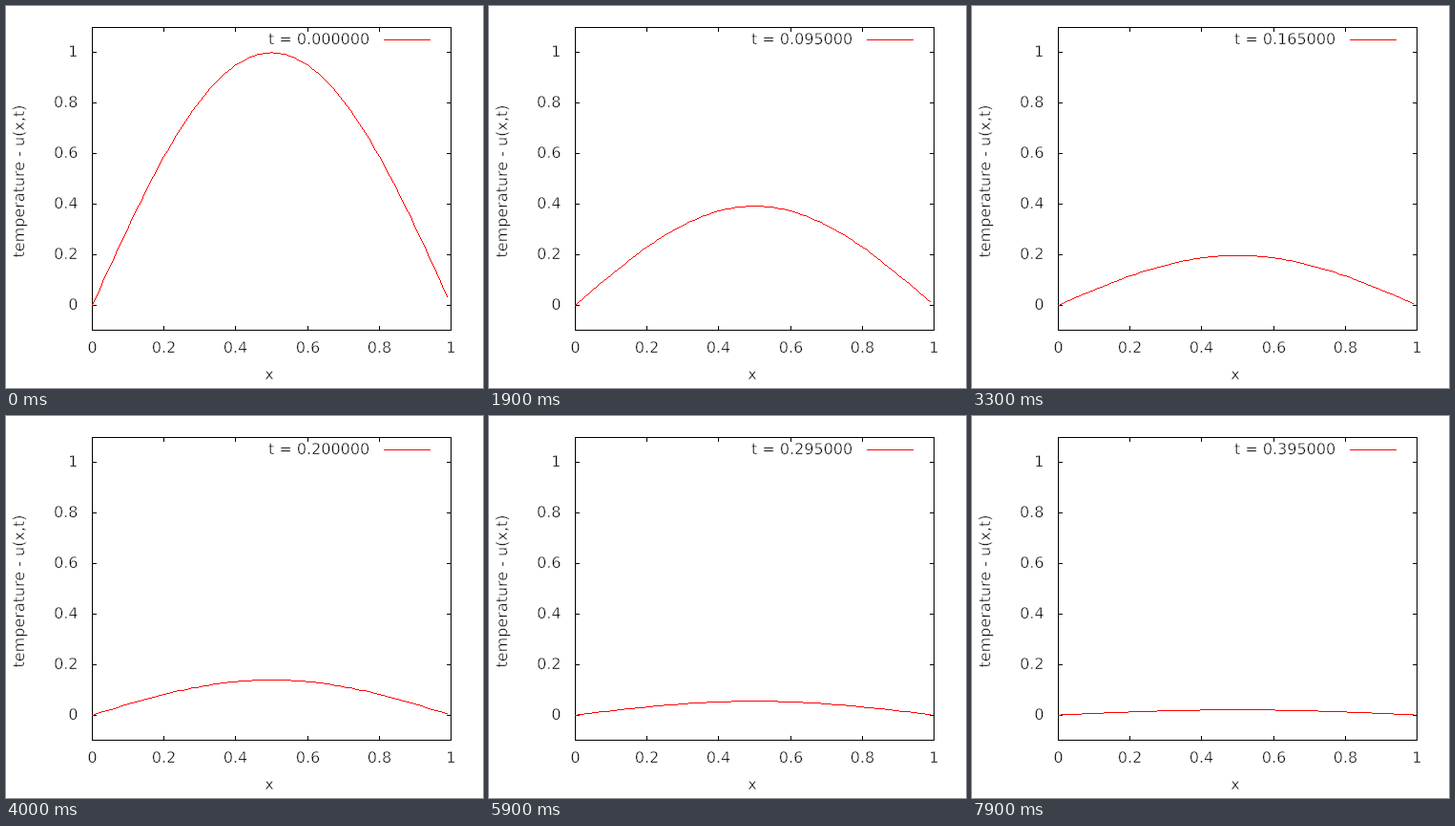
A matplotlib script that plays this animation: 500x400 px, repeating every 8000 ms.

```python
import numpy as np
import matplotlib.pyplot as plt
from matplotlib.animation import FuncAnimation
from matplotlib.patheffects import Stroke

W, H, DPI = 500, 400, 100
PX = 72 / DPI                       # one pixel in points
FRAMES, INTERVAL, DT = 80, 100, 0.005
LEFT, RIGHT, TOP, BOTTOM = 90, 466, 22, 339
TICK = 4
RED = "#ff0000"

plt.rcParams.update({
    "font.family": "DejaVu Sans",
    "font.size": 16 * PX,
    "path.simplify": False,
})

fig = plt.figure(figsize=(W / DPI, H / DPI), dpi=DPI, facecolor="white")
ax = fig.add_axes([0, 0, 1, 1])
ax.set(xlim=(0, W), ylim=(H, 0))
ax.axis("off")


def nearest(v):
    return np.floor(np.asarray(v) + 0.5)


def to_px(x, u):
    """Plot coordinates to the nearest pixel."""
    px = LEFT + np.asarray(x) * (RIGHT - LEFT)
    py = BOTTOM - (np.asarray(u) + 0.1) / 1.2 * (BOTTOM - TOP)
    return nearest(px), nearest(py)


def trace(xs, ys):
    """Stepped one-pixel line through the points, as unit dashes."""
    cells = [(xs[0], ys[0])]
    for x0, y0, x1, y1 in zip(xs, ys, xs[1:], ys[1:]):
        n = int(max(abs(x1 - x0), abs(y1 - y0)))
        s = np.arange(1, n + 1) / max(n, 1)
        cells += zip(nearest(x0 + s * (x1 - x0)), nearest(y0 + s * (y1 - y0)))
    cx, cy = np.array(cells).T
    gap = np.full_like(cx, np.nan)
    return (np.column_stack([cx, cx + 1, gap]).ravel(),
            np.column_stack([cy, cy, gap]).ravel() + 0.5)


def line(xs, ys, color="black"):
    return ax.plot(*trace(xs, ys), color=color, lw=PX, snap=False,
                   solid_capstyle="butt")[0]


def label(x, y, s, ha="left", **kw):
    """Text in a light weight: a white outline trims the strokes."""
    thin = [Stroke(linewidth=0.5 * PX, foreground="white")]
    return ax.text(x, y, s, ha=ha, va="baseline", path_effects=thin, **kw)


x = np.arange(100) / 100
mode = np.sin(np.pi * x)

# Frame, ticks and tick labels
line([LEFT, RIGHT, RIGHT, LEFT, LEFT], [TOP, TOP, BOTTOM, BOTTOM, TOP])
for v in np.arange(6) / 5:
    tx, ty = to_px(v, v)
    line([tx, tx], [BOTTOM, BOTTOM - TICK])
    line([tx, tx], [TOP, TOP + TICK])
    line([LEFT, LEFT + TICK], [ty, ty])
    line([RIGHT, RIGHT - TICK], [ty, ty])
    label(tx + 0.5, 363, f"{v:g}", "center")
    label(75.5, ty + 5, f"{v:g}", "right")

label(276, 391, "x", "center")
label(19, 263.5, "temperature - u(x,t)", rotation=90, rotation_mode="anchor")

curve = line(*to_px(x, mode), color=RED)
clock = label(275, 40, "")
line([396, 444], [35, 35], color=RED)


def update(i):
    t = i * DT
    curve.set_data(*trace(*to_px(x, np.exp(-np.pi ** 2 * t) * mode)))
    clock.set_text(f"t = {t:.6f}")
    return curve, clock


anim = FuncAnimation(fig, update, frames=FRAMES, interval=INTERVAL,
                     repeat=True, repeat_delay=0)
plt.show()
```
